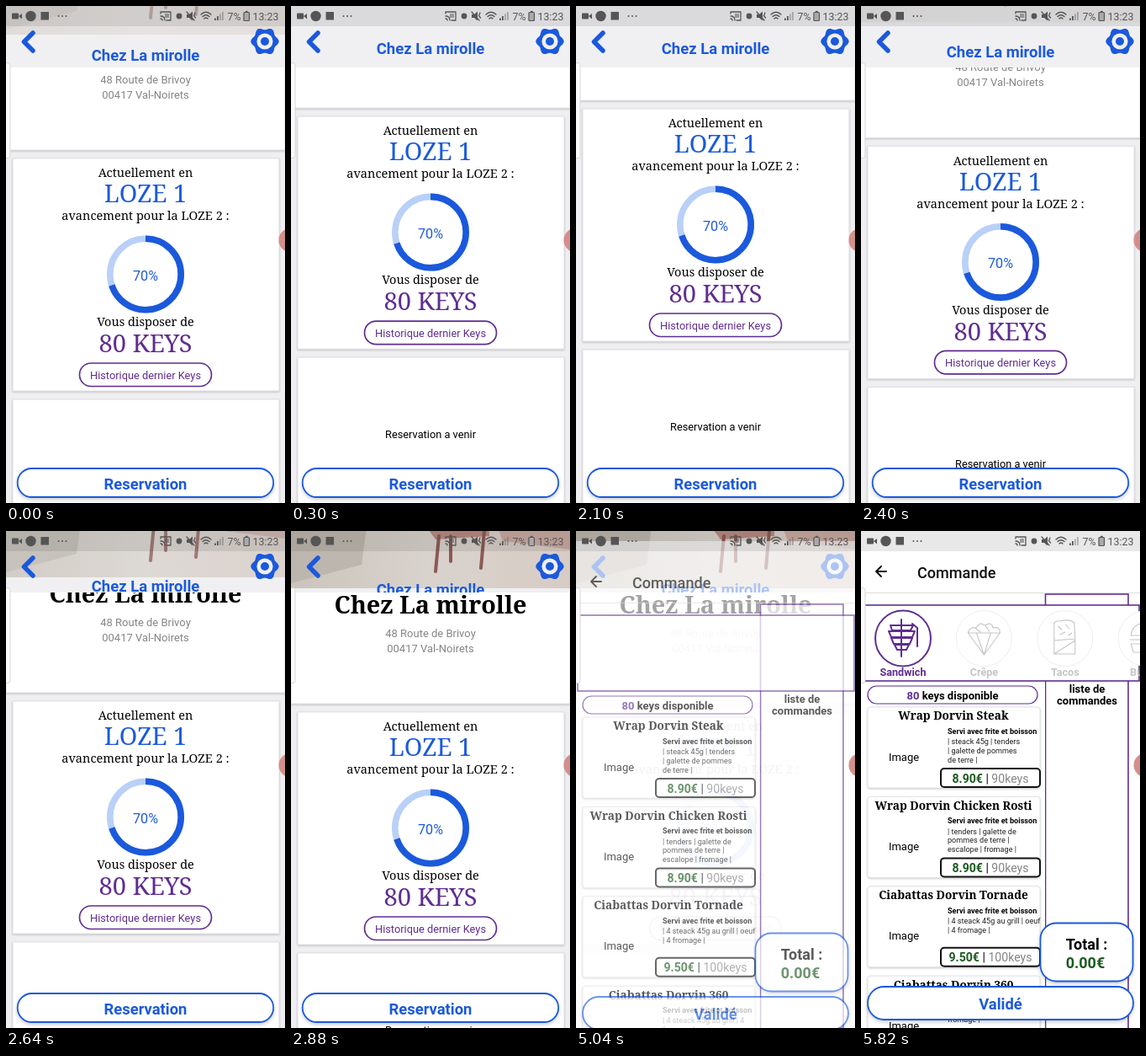
Animation of 332 by 590 pixels, one loop 6.48 s. Source, as an HTML page:

```html
<!DOCTYPE html>
<html lang="fr">
<head>
<meta charset="utf-8">
<title>Commande</title>
<style>
  html, body { margin: 0; width: 100%; height: 100%; overflow: hidden; background: #fff; }
  svg { display: block; width: 100vw; height: 100vh; }
  text { font-family: Roboto, sans-serif; white-space: pre; }
  .serif { font-family: "Noto Serif", serif; }
  .bold { font-weight: 700; }
  .medium { font-weight: 500; }
  .card { fill: #fff; stroke: #e2e1e6; stroke-width: 1; filter: drop-shadow(0 1px 1px #0003); }
  .raised { filter: drop-shadow(0 2px 2px #0003); }
  .line { fill: none; stroke-linecap: round; stroke-linejoin: round; }
</style>
</head>
<body>
<svg id="stage" viewBox="0 0 332 590"></svg>
<script>
const BLUE = '#1b59dc', PURPLE = '#5f2d91', GREEN = '#1c5a20', GREY = '#858585';
const PLACE = 'Chez La mirolle', LEVEL = 'LOZE';
const LOOP = 6480, STEP = 60;

// Text is placed by the middle of its capitals.
const text = (x, y, size, str, fill = '#000', cls = '', anchor = 'middle') =>
  `<text x="${x}" y="${y + size * 0.356}" font-size="${size}" fill="${fill}" class="${cls}" text-anchor="${anchor}">${str}</text>`;
const rect = (x, y, w, h, attrs) => `<rect x="${x}" y="${y}" width="${w}" height="${h}" ${attrs}/>`;
const outline = (x, y, w, h, r, color, width, cls = '') =>
  rect(x, y, w, h, `rx="${r}" fill="#fff" stroke="${color}" stroke-width="${width}" class="${cls}"`);
const circle = (x, y, r, attrs) => `<circle cx="${x}" cy="${y}" r="${r}" ${attrs}/>`;
const line = (d, color, width) => `<path d="${d}" class="line" stroke="${color}" stroke-width="${width}"/>`;
const colored = (str, color, cls = '') => `<tspan fill="${color}" class="${cls}">${str}</tspan>`;

function gear(cx, cy) {
  let d = '';
  for (let i = 0; i < 96; i++) {
    const a = i / 96 * 2 * Math.PI;
    const r = 15.2 + 1.5 * Math.cos(6 * a);
    d += `${i ? 'L' : 'M'}${(cx + r * Math.cos(a)).toFixed(2)} ${(cy + r * Math.sin(a)).toFixed(2)}`;
  }
  return `<path d="${d}Z" fill="${BLUE}"/>` +
    circle(cx, cy, 9.6, 'fill="#f0f0f2"') + circle(cx, cy, 5, `fill="${BLUE}"`);
}

const photo = `
  ${rect(0, -20, 332, 88, 'fill="url(#floor)"')}
  <path d="M0 -20H92L84 40L0 62Z" fill="#bdb6ae"/>
  <path d="M150 -20H236V6L172 10Z" fill="#b98a82"/>
  ${line('M176 6L172 48M190 6V36M230 0L226 44', '#8d5a54', 4)}
  <path d="M240 -20H332V22L252 12Z" fill="#c9aaa2"/>`;

const homeContent = `
  ${rect(0, -60, 332, 265, 'class="card"')}
  ${text(166, 88, 28.8, PLACE, '#000', 'serif bold')}
  ${text(166, 121, 13, '48 Route de Brivoy', GREY)}
  ${text(166, 139, 13, '00417 Val-Noirets', GREY)}
  ${rect(8, 215, 317, 276, 'class="card"')}
  ${text(166, 232, 14.5, 'Actuellement en', '#000', 'serif')}
  ${text(166, 257, 29, LEVEL + ' 1', BLUE, 'serif')}
  ${text(166, 283, 14.5, `avancement pour la ${LEVEL} 2 :`, '#000', 'serif')}
  ${circle(166, 352.5, 42.2, 'fill="none" stroke="#b9d0f8" stroke-width="7.6"')}
  ${circle(166, 352.5, 42.2, `fill="none" stroke="${BLUE}" stroke-width="7.6" pathLength="100" stroke-dasharray="70 30" transform="rotate(-90 166 352.5)"`)}
  ${text(166, 354, 16.2, '70%', BLUE)}
  ${text(166, 409, 14.5, 'Vous disposer de', '#000', 'serif')}
  ${text(166, 435, 29, '80 KEYS', PURPLE, 'serif')}
  ${outline(87.5, 458, 157, 27.5, 13.7, PURPLE, 1.7)}
  ${text(166, 472, 12.8, 'Historique dernier Keys', PURPLE)}
  ${rect(8, 501, 317, 184, 'class="card"')}
  ${text(166, 592.5, 12.8, 'Reservation a venir')}`;

const home = `
  ${rect(0, 0, 332, 590, 'fill="#efeef1"')}
  <g id="scroller">${homeContent}</g>
  <g clip-path="url(#headerClip)">
    ${rect(0, 0, 332, 73, 'fill="#f0f0f2"')}
    <g id="photo">${photo}</g>
    <g id="title">${text(166, 0, 18.5, PLACE, BLUE, 'bold')}</g>
  </g>
  ${line('M32 32L21.5 42.5L32 53', BLUE, 5.5)}
  ${gear(308, 42)}
  <g id="reserve">
    ${outline(13.7, 549, 304.5, 34, 17, BLUE, 1.8, 'raised')}
    ${text(166, 567.5, 18.4, 'Reservation', BLUE, 'bold')}
  </g>`;

const dishes = [
  ['Wrap Dorvin Steak', '8.90', 90, ['| steack 45g | tenders', '| galette de pommes', 'de terre |']],
  ['Wrap Dorvin Chicken Rosti', '8.90', 90, ['| tenders | galette de', 'pommes de terre |', 'escalope | fromage |']],
  ['Ciabattas Dorvin Tornade', '9.50', 100, ['| 4 steack 45g au grill | oeuf', '| 4 fromage |']],
  ['Ciabattas Dorvin 360', '9.50', 100, ['| 4 steack 45g au grill | 4', 'fromage |']],
];
const dish = ([name, price, keys, lines], i) => `
  <g transform="translate(0 ${i * 106.4})">
    ${rect(8, 209, 205, 96, 'rx="3" class="card"')}
    ${text(110, 219.5, 13.6, name, '#000', 'serif bold')}
    ${text(103, 237.5, 9.1, 'Servi avec frite et boisson', '#000', 'bold', 'start')}
    ${lines.map((s, n) => text(103, 250 + n * 10.7, 9.1, s, '#222', '', 'start')).join('')}
    ${text(51, 268, 13, 'Image')}
    ${outline(95, 282, 118, 22, 4, '#111', 2)}
    ${text(154, 293.5, 14.1, colored(price + '€', GREEN, 'bold') + ' | ' + colored(keys + 'keys', GREY))}
  </g>`;

const icons = [
  'M-2 -22V22M-15 -15H12L9 -9H-13ZM-17 -8H14L11 -1H-14ZM-14 0H11L8 7H-11ZM-10 8H7L4 14H-7ZM11 -17L17 -12V10',
  'M-19 -6L0 20L19 -6ZM-19 -6Q-17 -14 -9 -12Q-6 -20 1 -15Q9 -20 11 -12Q19 -14 19 -6M-9 -6L0 20L8 -6M-10 -11L-4 -7M2 -14L6 -8',
  'M-13 -17Q-12 -21 -5 -20Q5 -23 11 -18L12 1L-13 3ZM-13 3L12 1V19H-13ZM-13 19L12 3M-8 -14L-4 -10M1 -16L5 -11M-6 -4L0 -7M4 -3L8 -6',
  'M-18 -3Q-16 -18 0 -18Q16 -18 18 -3ZM-19 2H19M-18 7H18L15 17H-15Z',
];
const category = (name, i) => {
  const x = 50 + i * 96.4, color = i ? '#c6c6c6' : PURPLE;
  return circle(x, 127.5, 33, `fill="#fff" stroke="${i ? '#eeeeee' : PURPLE}" stroke-width="${i ? 1 : 2}"`) +
    `<g transform="translate(${x} 127)">${line(icons[i], color, i ? 1.1 : 2)}</g>` +
    text(x, 168, 12.6, name, color, 'bold');
};

// Each direct child fades on its own, so layers show through one another.
const order = `
  ${rect(0, 0, 332, 602, 'fill="#fff"')}
  ${rect(0, 88, 332, 514, 'fill="#fff"')}
  <g>
    ${line('M30 48H18.5M24 42L18 48L24 54', '#111', 1.9)}
    ${text(67, 49.5, 18.1, 'Commande', '#111', 'medium', 'start')}
    ${line('M0 73.5H332', '#dddddd', 1)}
  </g>
  <g>
    ${outline(219.5, 75, 98.5, 540, 0, PURPLE, 1.6)}
    ${text(269, 187, 13, 'liste de', '#000', 'bold')}
    ${text(269, 201.5, 13, 'commandes', '#000', 'bold')}
  </g>
  <g>${rect(0, 178, 219, 424, 'fill="#fff"')}${dishes.map(dish).join('')}</g>
  <g>
    ${outline(8, 184, 202, 21, 10.5, PURPLE, 1.2)}
    ${text(109, 195, 13, colored('80', PURPLE) + ' keys disponible', '#000', 'bold')}
  </g>
  <g>
    ${outline(2, 88, 329, 90, 0, PURPLE, 1.6)}
    <g id="categories">${['Sandwich', 'Crêpe', 'Tacos', 'Burger'].map(category).join('')}</g>
  </g>
  <g>
    ${outline(213.5, 465.5, 110, 69, 19, BLUE, 1.8, 'raised')}
    ${text(268.5, 491, 18, 'Total :', '#000', 'bold')}
    ${text(267, 512.5, 18, '0.00€', GREEN, 'bold')}
  </g>
  <g>
    ${outline(8, 541, 316, 39, 19.5, BLUE, 1.8, 'raised')}
    ${text(166, 561.5, 18.4, 'Validé', BLUE, 'bold')}
  </g>`;

const INK = '#555';
const system = `
  ${rect(0, 0, 332, 24, 'fill="#000" opacity=".09"')}
  ${rect(7, 8.5, 8, 7, `rx="1" fill="${INK}"`)}
  <path d="M15 12L19 9V15.5Z" fill="${INK}"/>
  ${circle(29.5, 12, 6.2, `fill="${INK}"`)}
  ${rect(41.5, 7, 9.5, 9.5, `fill="${INK}"`)}
  ${[62.5, 67, 71.5].map(x => circle(x, 12, 1, `fill="${INK}"`)).join('')}
  ${line('M184 9V7H196V17H191M184 12Q189 12 189 17M184 15Q186 15 186 17', INK, 1.3)}
  ${rect(189, 9, 5, 5, `fill="${INK}" opacity=".5"`)}
  ${circle(206, 12, 3.4, `fill="${INK}"`)}
  <path d="M215 10h3l4-3.5v11l-4-3.5h-3z" fill="${INK}"/>
  ${line('M215 7L224 17M225 8L223.5 11.5L225.5 14', INK, 1.3)}
  ${line('M232 10Q238 4.5 244 10M234 12.5Q238 9 242 12.5M236 15Q238 13 240 15', INK, 1.4)}
  ${[0, 1, 2, 3].map(i => rect(248 + i * 3, 14.5 - i * 2.5, 1.8, 2.5 + i * 2.5, `fill="${INK}" opacity="${i < 2 ? 1 : .4}"`)).join('')}
  ${text(271.5, 12.3, 12.4, '7%', INK)}
  ${rect(283, 7.5, 6.5, 10, `rx="1" fill="#aaa" stroke="${INK}" stroke-width="1.2"`)}
  ${rect(285, 5.8, 2.6, 1.7, `fill="${INK}"`)}
  ${text(309, 12.3, 12.4, '13:23', INK)}
  ${rect(-6, 67.5, 11, 113, 'rx="3" fill="#fafafa" stroke="#d9d9dc" stroke-width="1"')}
  ${circle(338.5, 278, 14, 'fill="#d48f8c"')}`;

const stage = document.getElementById('stage');
stage.innerHTML = `
  <defs>
    <clipPath id="headerClip">${rect(0, 0, 332, 73, '')}</clipPath>
    <linearGradient id="floor"><stop stop-color="#cbc4bc"/><stop offset=".5" stop-color="#d9d3cd"/><stop offset="1" stop-color="#d8cbc5"/></linearGradient>
  </defs>
  <g>${home}</g><g id="order">${order}</g><g>${system}</g>`;

const part = id => document.getElementById(id);
const [scroller, photoLayer, title, reserve, orderScreen, categories] =
  ['scroller', 'photo', 'title', 'reserve', 'order', 'categories'].map(part);
const shift = (el, y) => el.setAttribute('transform', `translate(0 ${y.toFixed(2)})`);
const progress = (t, from, to) => Math.min(1, Math.max(0, (t - from) / (to - from)));

function scrollAt(t) {
  if (t < 2100) return 105 - 71 * (1 - progress(t, 0, 660)) ** 2;
  if (t < 2640) return 93 - 80 * progress(t, 2100, 2640);
  return 13 * (1 - progress(t, 2640, 2880)) ** 3;
}

function draw(t) {
  const scroll = scrollAt(t);
  shift(scroller, -scroll);
  shift(photoLayer, -scroll);
  photoLayer.setAttribute('opacity', Math.max(0, 1 - scroll / 62));
  shift(title, Math.max(50, 69 - scroll * 0.3));
  reserve.setAttribute('opacity', 1 - 0.8 * progress(t, 3060, 3240));

  const rest = (1 - progress(t, 5040, 5280)) ** 2;
  orderScreen.setAttribute('display', t < 5040 ? 'none' : 'inline');
  shift(orderScreen, 12 * rest);
  for (const layer of orderScreen.children) layer.setAttribute('opacity', 1 - 0.36 * rest);
  categories.setAttribute('display', t < 5760 ? 'none' : 'inline');
}

const start = performance.now();
function tick() {
  const t = (performance.now() - start) % LOOP;
  draw(Math.floor(t / STEP) * STEP);
  requestAnimationFrame(tick);
}
tick();
</script>
</body>
</html>
```
